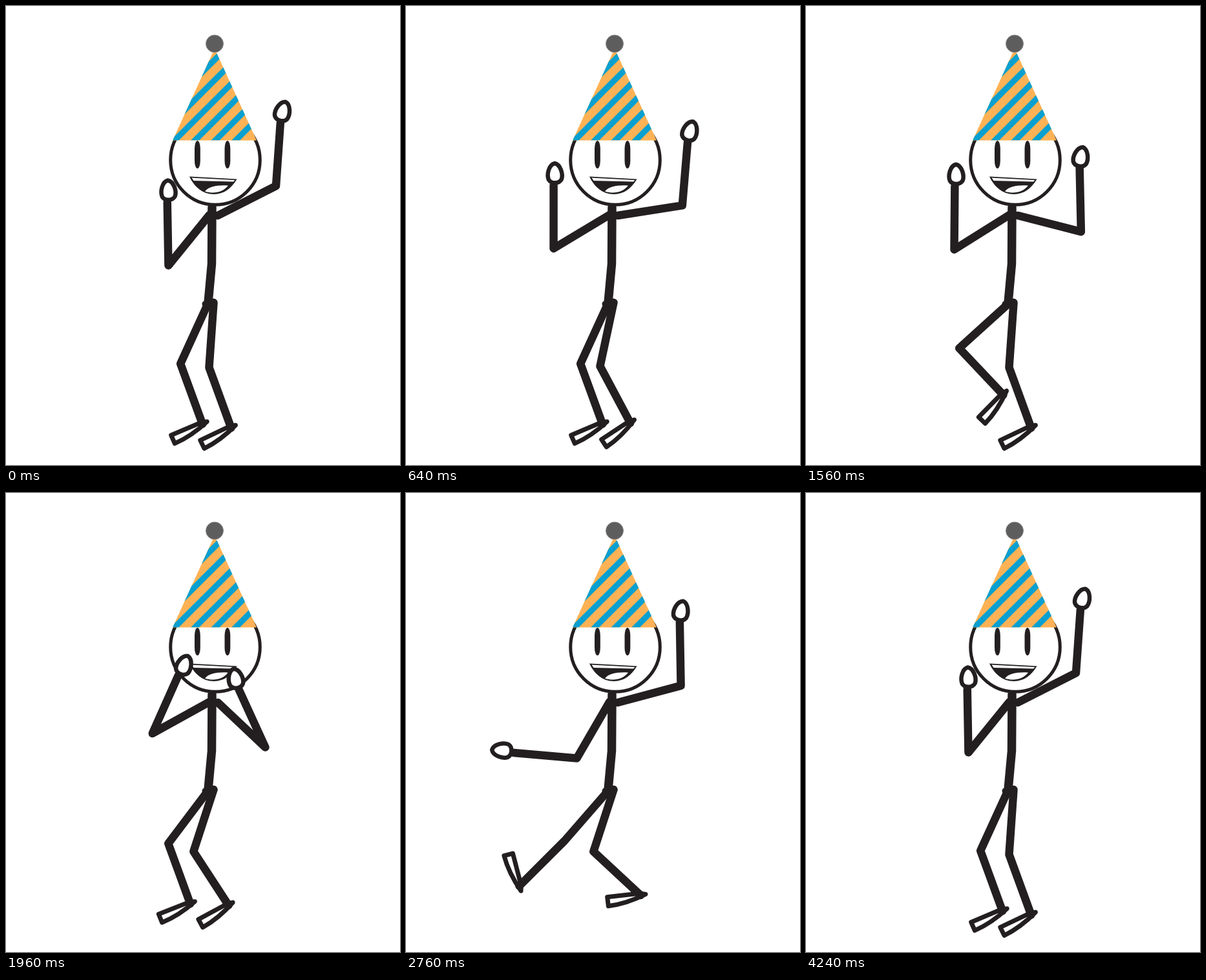
An HTML page with a canvas for the animation above (4.28 s loop, 610 px wide and 712 px high).

```html
<!DOCTYPE html>
<html lang="en">
<head>
<meta charset="utf-8">
<title>Party dance</title>
<style>
  html, body { margin: 0; width: 100%; height: 100%; overflow: hidden; background: #fff; }
  canvas { display: block; }
</style>
</head>
<body>
<canvas id="stage" width="610" height="712"></canvas>
<script>
const ctx = document.getElementById('stage').getContext('2d');
const INK = '#231f20', LOOP = 4280, STEP = 40;
const BEAT = 850 / 3;

// Joint angles in degrees. Arms: upper, forearm. Legs: thigh, shin, foot.
const rest = { armL: [129, 269], armR: [-27, -86], legL: [114.5, 70, 152.5], legR: [94, 70, 150] };
const cheeks = { armL: [151, 294], armR: [43.4, -114.5], legL: [127, 70, 154], legR: [108, 57, 147] };
const kick = { armL: [120, 185], armR: [-15, -91], legL: [131, 135, 251], legR: [108, 43, 169] };

const LIFT = [31, -31, -30];
const turn = (angles, by) => angles.map((a, i) => a + by[i]);
const blend = (from, to, k) => from.map((a, i) => a + (to[i] - a) * k);
const mix = (from, to, k) => Object.fromEntries(
  Object.keys(from).map(part => [part, blend(from[part], to[part], k)]));

const stepRight = {
  ...rest,
  armL: turn(rest.armL, [77, 4]), armR: turn(rest.armR, [70, 3]),
  legR: turn(rest.legR, LIFT)
};
const stepLeft = {
  ...rest,
  armL: turn(rest.armL, [25, 2]), armR: turn(rest.armR, [55, -7]),
  legL: turn(rest.legL, LIFT)
};
const hop = { ...mix(cheeks, kick, 0.35), legL: [141, 80, 170], legR: [118, 45, 158] };
const swing = { ...mix(kick, rest, 0.5), armL: [123, 212], armR: [47, -77] };

const keys = [
  [0, rest], [BEAT, stepRight], [2 * BEAT, rest], [3 * BEAT, stepRight], [4 * BEAT, rest],
  [6 * BEAT, stepLeft], [1960, cheeks], [2240, hop], [2760, kick],
  [3240, kick], [3740, swing], [4240, rest], [LOOP, rest]
];

function poseAt(t) {
  const i = keys.findIndex(([end]) => t < end);
  const [t0, from] = keys[i - 1], [t1, to] = keys[i];
  return mix(from, to, (t - t0) / (t1 - t0));
}

const rad = deg => deg * Math.PI / 180;
const reach = ([x, y], deg, length) =>
  [x + length * Math.cos(rad(deg)), y + length * Math.sin(rad(deg))];

function line(points, width) {
  ctx.beginPath();
  points.forEach(p => ctx.lineTo(...p));
  ctx.lineWidth = width;
  ctx.strokeStyle = INK;
  ctx.stroke();
}

function fill(path, color) {
  ctx.fillStyle = color;
  ctx.fill(new Path2D(path));
}

function outline(path, [x, y], deg, width) {
  ctx.save();
  ctx.translate(x, y);
  ctx.rotate(rad(deg));
  fill(path, '#fff');
  ctx.strokeStyle = INK;
  ctx.lineWidth = width;
  ctx.stroke(new Path2D(path));
  ctx.restore();
}

function disc(x, y, r, color, edge, width) {
  ctx.beginPath();
  ctx.arc(x, y, r, 0, 7);
  ctx.fillStyle = color;
  ctx.fill();
  ctx.strokeStyle = edge;
  ctx.lineWidth = width;
  ctx.stroke();
}

function arm(shoulder, [upper, fore], tilt) {
  const elbow = reach(shoulder, upper, 101);
  const wrist = reach(elbow, fore, 98);
  line([shoulder, elbow, wrist], 12.5);
  outline('M17 2C15 11 0 15-8 12C-15 8-15-4-8-8C0-11 15-7 17 2Z', reach(wrist, fore, 17), fore + tilt, 6.5);
}

function leg(hip, [thigh, shin, foot]) {
  const knee = reach(hip, thigh, 101);
  const ankle = reach(knee, shin, 99.5);
  outline('M-8 0Q24-9 52-7L51 7L0 3Z', ankle, foot, 7);
  line([hip, knee, ankle], 12.5);
}

function hat() {
  ctx.save();
  ctx.beginPath();
  [[323, 66], [388, 208.5], [258, 208.5]].forEach(p => ctx.lineTo(...p));
  ctx.clip();
  ctx.fillStyle = '#ffb255';
  ctx.fillRect(250, 60, 145, 150);
  for (let x = 160; x < 370; x += 31.5)
    fill(`M${x} 208.5h13l160-160h-13Z`, '#08a0d0');
  ctx.restore();
  disc(323, 58.5, 13.5, '#5d5d5d', '#858585', 1);
}

function head() {
  disc(324, 239, 69.3, '#fff', INK, 5);
  for (const x of [296.4, 342.9]) {
    ctx.beginPath();
    ctx.ellipse(x, 221, 4.4, 12, 0, Math.PI, 0);
    ctx.ellipse(x, 240, 4.4, 12, 0, 0, Math.PI);
    ctx.fillStyle = INK;
    ctx.fill();
  }
  fill('M284 264.5L357.5 268.5C349 283 337 292 322 292C304 292 291 280 284 264.5Z', INK);
  fill('M287.5 266.5L354.5 270L352 272.5L290.5 271Z', '#fff');
  fill('M308 287.5C314 280 326 277.5 344 278.5C336 289 322 292 308 287.5Z', '#fff');
  hat();
}

function draw(now) {
  const pose = poseAt(Math.floor(now % LOOP / STEP) * STEP);
  ctx.fillStyle = '#fff';
  ctx.fillRect(0, 0, 610, 712);
  ctx.lineCap = ctx.lineJoin = 'round';
  leg([312, 463], pose.legL);
  leg([321.5, 460], pose.legR);
  line([[319, 312], [318.5, 400], [313, 460]], 13.5);
  line([[308, 462], [313, 461]], 9);
  head();
  arm([315, 324], pose.armL, -2);
  arm([328, 325], pose.armR, 13);
}

let start;
function tick(now) {
  start ??= now;
  draw(now - start);
  requestAnimationFrame(tick);
}
draw(0);
requestAnimationFrame(tick);
</script>
</body>
</html>
```
